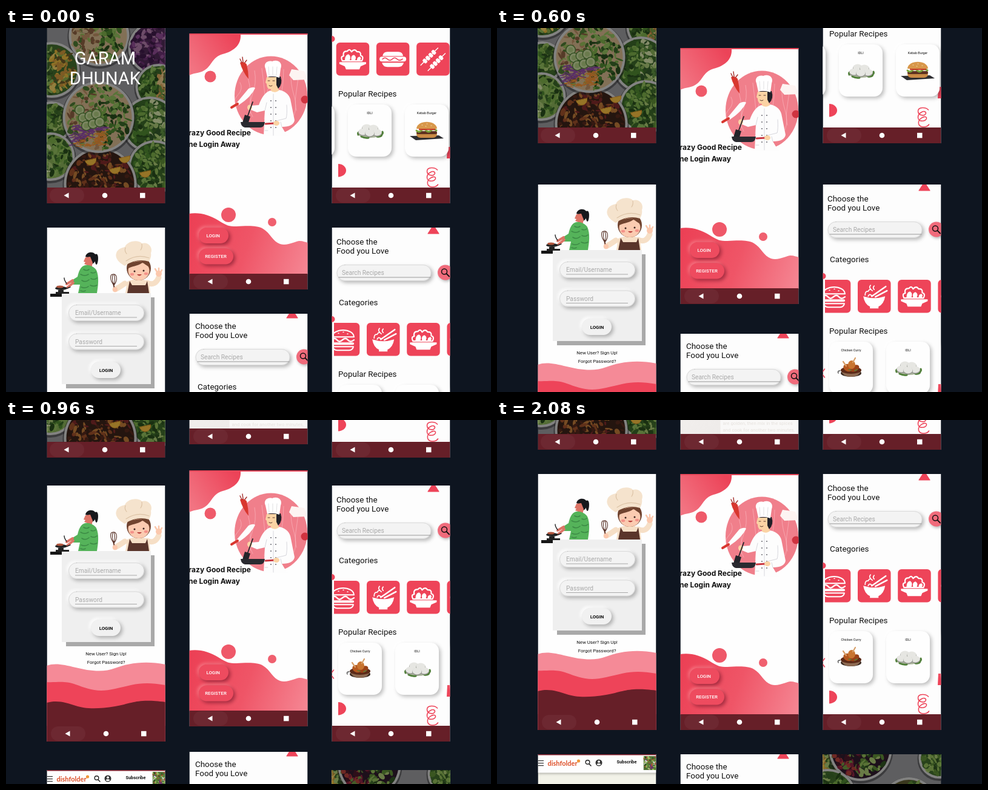
These frames come from a looping animation (800x600 px, 3.04 s). An HTML page with a canvas:

```html
<!DOCTYPE html>
<html lang="en">
<head>
<meta charset="utf-8">
<title>Recipe app screens</title>
<style>
html, body { margin: 0; width: 100%; height: 100%; overflow: hidden; background: #0e1520; }
canvas { display: block; }
</style>
</head>
<body>
<canvas id="stage" width="800" height="600"></canvas>
<script>
const W = 195, H = 422, RED = '#ee4459', DARK = '#661f28', INK = '#111';
const stage = document.getElementById('stage').getContext('2d');
let g;

// ---------- drawing helpers ----------
function screen(draw) {
  const c = document.createElement('canvas');
  c.width = 196;
  c.height = H;
  g = c.getContext('2d');
  g.lineCap = g.lineJoin = 'round';
  g.translate(0.5, 0);
  g.beginPath();
  g.rect(0, 0, W, H);
  g.clip();
  draw();
  return c;
}
function rect(x, y, w, h, fill) {
  g.fillStyle = fill;
  g.fillRect(x, y, w, h);
}
function shape(d, fill, stroke, lw = 1) {
  const p = new Path2D(d);
  if (fill) { g.fillStyle = fill; g.fill(p); }
  if (stroke) { g.strokeStyle = stroke; g.lineWidth = lw; g.stroke(p); }
}
const line = (d, col, lw) => shape(d, null, col, lw);
function oval(x, y, rx, ry, fill, rot = 0) {
  g.fillStyle = fill;
  g.beginPath();
  g.ellipse(x, y, rx, ry, rot, 0, Math.PI * 2);
  g.fill();
}
const disc = (x, y, r, fill) => oval(x, y, r, r, fill);
function round(x, y, w, h, r, fill) {
  g.fillStyle = fill;
  g.beginPath();
  g.roundRect(x, y, w, h, r);
  g.fill();
}
function shadow(col, blur = 0, dx = 0, dy = dx) {
  g.shadowColor = col;
  g.shadowBlur = blur;
  g.shadowOffsetX = dx;
  g.shadowOffsetY = dy;
}
function soft(x, y, w, h, r, fill, dark, light) {
  shadow(light, 5, -2.5);
  round(x, y, w, h, r, fill);
  shadow(dark, 6, 3);
  round(x, y, w, h, r, fill);
  shadow('transparent');
}
function text(s, x, y, size, col = INK, align = 'left', weight = 400, face = 'Roboto') {
  g.font = `${weight} ${size}px ${face}, sans-serif`;
  g.textAlign = align;
  g.fillStyle = col;
  g.fillText(s, x, y);
}
function blend(x0, y0, x1, y1, ...cols) {
  const f = g.createLinearGradient(x0, y0, x1, y1);
  cols.forEach((c, i) => f.addColorStop(i / (cols.length - 1), c));
  return f;
}
function at(x, y, draw) {
  g.save();
  g.translate(x, y);
  draw();
  g.restore();
}
function nav(x = 34.5) {
  rect(0, 396, W, 26, DARK);
  round(x - 28, 397, 57, 24, 12, '#6d2831');
  shape(`M${x - 4.5} 409l8-4.5v9z`, '#fff');
  disc(x + 63, 409, 4.3, '#fff');
  rect(x + 121, 404.8, 8.5, 8.5, '#fff');
}
function field(label, x, y, w, tx) {
  soft(x, y, w, 27, 13.5, '#f3f3f3', 'rgba(0,0,0,.28)', '#fff');
  g.strokeStyle = 'rgba(0,0,0,.1)';
  g.lineWidth = 1;
  g.beginPath();
  g.roundRect(x + 0.5, y + 0.5, w - 1, 26, 13);
  g.stroke();
  text(label, tx, y + 17, 10.2, '#a9a9a9');
}

// ---------- salad photo ----------
function rng(seed) {
  return () => (seed = (seed * 16807) % 2147483647) / 2147483647;
}
const greens = ['#5d8a35', '#8fb857', '#2f5220', '#a9c670', '#416a2b'];
const mix = {
  red: ['#8a2440', '#4a1828', '#b2413a', '#6f9440', '#2f1a2c'],
  green: greens,
  corn: ['#e3b43c', '#eccb62', '#8aa848', '#6d5a28', '#c9923a'],
  plum: ['#6b3070', '#8f4c92', '#3f1a48', '#b07aa8', '#4f2a55'],
  chips: ['#d8a55a', '#b98440', '#6d9540', '#e6c585', '#5f5a30'],
  meat: ['#b98c62', '#92b857', '#8a5f40', '#4c7730', '#d2b48a'],
  pale: ['#a8c574', '#5f9040', '#d3dfa8', '#34592a', '#86ad55'],
  leaf: ['#4f8530', '#7bab48', '#284c1c', '#90bb5c', '#3a6628'],
  grain: ['#9a4f2a', '#55281c', '#bd7838', '#7d2a2a', '#3a2218']
};
// [x, y, radius, left filling, right filling]
const bowls = [
  [4, 0, 36, 'corn', 'green'], [62, -8, 52, 'red', 'green'], [192, 6, 34, 'green', 'green'],
  [8, 72, 48, 'green', 'leaf'], [142, 84, 46, 'chips', 'green'], [86, 146, 50, 'meat', 'leaf'],
  [8, 202, 46, 'green', 'corn'], [178, 166, 44, 'plum', 'plum'], [184, 230, 38, 'leaf', 'chips'],
  [8, 288, 34, 'leaf', 'green'], [6, 345, 40, 'pale', 'leaf'], [170, 292, 46, 'leaf', 'pale'],
  [178, 362, 44, 'leaf', 'green'], [88, 390, 60, 'grain', 'grain'], [85, 280, 59, 'meat', 'leaf']
];
function salad() {
  const rnd = rng(77);
  rect(0, 0, W, H, '#97979a');
  for (const [x, y, r, left, right] of bowls) {
    disc(x, y + 2, r + 2, 'rgba(40,40,45,.5)');
    disc(x, y, r, '#d2d2d0');
    disc(x, y, r - 4, mix[left][4]);
    for (let i = 0; i < r * 4; i++) {
      const a = rnd() * 6.283, d = Math.sqrt(rnd()) * (r - 7);
      const dx = d * Math.cos(a);
      oval(x + dx, y + d * Math.sin(a), 2 + rnd() * 5, 1.2 + rnd() * 3,
        mix[dx < 0 ? left : right][Math.floor(rnd() * 5)], rnd() * 3.14);
    }
  }
  // shredded cabbage and carrot, cucumber, lemon wedges
  for (let i = 0; i < 110; i++) {
    const x = 36 + rnd() * 56, y = 294 + rnd() * 34;
    line(`M${x} ${y}q${rnd() * 8} ${rnd() * 8 - 6} ${6 + rnd() * 7} ${rnd() * 8 - 4}`,
      x + 2 * y < 690 ? '#8e4aa2' : '#ee8f35', 1.6);
  }
  for (let i = 0; i < 7; i++) {
    const x = 54 + i * 5.5, y = 268 + (i * 13) % 29;
    disc(x, y, 8.5, '#4f7d34');
    disc(x, y, 7.2, '#c5d69a');
    disc(x, y, 4, '#abc67c');
  }
  for (const [x, y] of [[128, 348], [162, 372], [72, 352], [112, 366]]) {
    shape(`M${x - 9} ${y}a9 9 0 0 0 18 -4z`, '#f2bb3f', '#dc9428');
  }
  rect(0, 0, W, H, 'rgba(0,0,0,.38)');
}

function welcome() {
  salad();
  text('GARAM', 96, 192.5, 29.2, '#fff', 'center');
  text('DHUNAK', 96, 226, 29.2, '#fff', 'center');
  nav(32.5);
}

// ---------- sign-in ----------
function cook() {
  shape('M147 133C152 130 153 139 151 147C150 151 148 151 147 146L145 136Z', '#17181c');
  shape('M131 137C132 129 144 127 148 134C150 141 146 148 142 149L137 139Z', '#17181c');
  shape('M131 138L139 137L143 147L141 156L133 155L134 151L129 149L131 146L128 145Z', '#dd7567');
  shape('M128 152C134 149 144 152 149 159C154 170 152 185 150 197H119L122 183L109 183L107 177L118 170C120 162 122 155 128 152Z', '#55b35a');
  line('M128 158q5 3 9 0M123 166q7 4 13 0M140 163q5 2 8-1M125 176q6 4 12-1M140 173q6 3 10-1M124 187q7 3 12-1M139 184q6 3 11 0M123 193q5 2 8 0', '#3c8a45', 1.6);
  line('M111 180L101 188M110 176L100 182', '#dd7567', 4);
  oval(91, 189, 10, 3, '#222');
  oval(89, 186.5, 6, 2, '#b0563e');
  line('M101 189l5-2M100 181q-4-5-4-9', '#222', 1.4);
  rect(86, 192, 9, 5, '#222');
  rect(73, 198, 19, 5, '#161616');
  rect(82, 195, 22, 3, '#222');
}
function kid() {
  line('M196 181Q186 188 180 191M233 180Q246 186 252 171', '#f6dfc6', 9);
  line('M179 190l-2-9', '#6a3b2d', 2);
  shape('M178 184C170 174 172 166 176 166C182 165 186 174 178 184ZM178 184Q174 174 176 166M178 184Q181 174 178 167', null, '#5a352b', 1.1);
  disc(180, 191, 4, '#fbc8ad');
  disc(252, 165, 5, '#fbc8ad');
  line('M249 162l-3-5M252 161l0-5M255 163l2-4', '#fbc8ad', 2.6);
  shape('M200 178Q218 170 236 178L238 197H197Z', '#f6dfc6');
  shape('M204 177L208 184H230L233 177L236 197H200Z', '#5a352b');
  disc(219, 156, 20, '#70432f');
  oval(219, 160, 17.5, 16, '#fbcbb1');
  shape('M200 157C202 143 232 138 238 155C231 151 228 148 225 147C216 153 208 152 200 157Z', '#70432f');
  disc(212, 161, 1.5, '#3d2520');
  disc(227, 160, 1.5, '#3d2520');
  oval(208, 166, 3.2, 2.2, '#f4938a');
  oval(231, 165, 3.2, 2.2, '#f4938a');
  shape('M216 166q4 5 8 0z', '#b6413c');
  shape('M196 152C188 148 179 140 182 131C184 124 192 122 196 121C201 110 219 109 224 115C234 112 243 121 239 131C240 136 238 141 236 145Q215 139 196 152Z', '#f5e3cd');
  line('M198 144Q216 132 236 139M197 122q-2 6 2 10M224 116q1 6-2 10', '#dcc3a6', 1.2);
}
function signIn() {
  rect(0, 0, W, H, '#fefefe');
  at(-67.5, -89, () => {
    rect(99, 204, 146, 150, '#a9a9a9');
    rect(92, 197, 147, 150, '#efefef');
    cook();
    kid();
    field('Email/Username', 103, 216, 125, 114);
    field('Password', 103, 263.5, 125, 114);
    rect(114, 236.5, 102, 1, '#aaa');
    rect(114, 284, 102, 1, '#aaa');
    soft(140, 310, 49, 27, 13.5, '#f1f1f1', 'rgba(0,0,0,.28)', '#fff');
    text('LOGIN', 165, 327, 7.9, INK, 'center', 700);
    text('New User? Sign Up!', 165, 368.8, 7.8, INK, 'center');
    text('Forgot Password?', 165, 383.2, 7.8, INK, 'center');
    shape('M67 386C80 381 95 384 115 389S160 398 180 390S230 377 263 384V511H67Z', '#f58a97');
    shape('M67 413C85 414 95 410 115 417S150 431 180 424S225 411 263 418V511H67Z', RED);
    shape('M67 447C85 442 100 447 115 452S150 458 180 453S215 440 263 446V511H67Z', DARK);
  });
  nav();
}

// ---------- landing ----------
function chef() {
  oval(437, 191.5, 60, 65, '#f07f8b');
  for (let i = 0; i < 9; i++) {
    const x = 386 + i * 12, d = Math.sqrt(Math.max(0, 3300 - (x - 437) ** 2));
    line(`M${x} ${191 - d * 0.8}q${6 - i} ${d * 0.4} ${i % 2 ? 5 : -4} ${d * 0.8}t${i % 3 - 1} ${d * 0.7}`, 'rgba(255,205,210,.6)', 0.8);
  }
  // flying kitchen things
  shape('M386 137Q392 134 397 140Q400 152 400 164Q390 152 386 137Z', '#d8372f');
  line('M389 137l-3-6M391 136l-1-8M394 137l3-4', '#a32d2a', 1.4);
  shape('M380 204L400 180Q408 176 411 179Q404 194 384 207Z', '#fdfdfd');
  line('M372 211l10-6', '#d8372f', 4);
  shape('M471 148L492 151L497 165L474 166L467 158Z', '#fdf4f2');
  disc(493, 198, 6.5, '#cf3340');
  // figure
  shape('M432 160H453Q457 172 449 180L436 178Z', '#202028');
  shape('M430 161H446V174L452 186H437V181Q430 181 430 172L428 170Z', '#fbd3a4');
  line('M432 167h3M440 167h3M434 175q3 2 5 0', '#4a2c24', 0.9);
  shape('M431 161L428 147C424 139 431 133 439 135C448 131 457 137 453 147L451 162Q440 158 431 161Z', '#fff');
  line('M434 158l-1-14M440 157v-13M446 158l1-14', '#d7d7da', 0.8);
  shape('M436 183Q444 189 451 182Q468 186 470 202L476 232Q474 243 455 243L464 258H425L427 216L414 219L402 214L404 208L417 207Q424 187 436 183Z', '#fdfdfd');
  line('M427 216l3-13M441 189v68M463 207q1 16-1 22l-16 4M455 243l-2-8M432 249h-5', '#d3d3d8', 0.9);
  for (let y = 200; y < 250; y += 11) {
    disc(437, y, 0.9, '#55565e');
    disc(445, y, 0.9, '#55565e');
  }
  oval(402, 211, 4, 4.5, '#fbd3a4');
  line('M407 202L398 227', '#24242a', 1.8);
  shape('M394 223L403 226L399 239L390 236Z', '#24242a');
  shape('M387 235H427Q426 244 419 244H394Q388 243 387 235Z', '#2a2a30');
  line('M428 238l15-1', '#c93640', 2.8);
  oval(446, 237, 5, 4, '#fbd3a4');
}
function landing() {
  rect(0, 0, W, H, '#fefefe');
  at(-302.5, -89, () => {
    shape('M302 91H387C388 107 377 117 361 122C341 127 342 137 331 147C322 155 312 153 302 158Z', blend(302, 140, 375, 91, '#f27482', '#ec4358'));
    rect(302, 89, 196, 2, '#e9475a');
    disc(337, 160, 9.5, '#ef5a6a');
    chef();
    text('Crazy Good Recipe', 404, 257, 12, INK, 'right', 700, 'Inter');
    text('One Login Away', 386, 275.7, 12, INK, 'right', 700, 'Inter');
    const tint = blend(302, 400, 498, 470, '#ec4055', '#ef5567', '#f58592');
    shape('M302 386C318 383 336 388 350 397S368 407 380 407S412 404 424 411S440 432 452 436S478 431 484 431S494 433 498 434V486H302Z', tint);
    disc(367, 388, 12, '#ef5869');
    disc(439, 400, 7, '#f0606f');
    const d = 'rgba(95,10,30,.55)', l = 'rgba(255,140,150,.6)';
    soft(318, 409, 49, 26, 13, '#ee4b5f', d, l);
    soft(318, 443.5, 57, 26, 13, '#ee4b5f', d, l);
    text('LOGIN', 341.7, 425, 7.8, '#fff', 'center', 500);
    text('REGISTER', 346, 459.2, 7.8, '#fff', 'center', 500);
  });
  nav();
}

// ---------- home ----------
const icons = [
  () => {
    shape('M-18 -4C-17 -19 17 -19 18 -4Z', null, '#fff', 2);
    line('M-8 -10h1M0 -12h1M7 -9h1', '#fff', 1.6);
    line('M-19 1q5 -5 9 0t9 0t9 0t10 0', '#fff', 2.4);
    round(-18, 5, 36, 4, 2, '#fff');
    shape('M-17 12H17Q16 18 10 18H-10Q-16 18 -17 12Z', null, '#fff', 2);
  },
  () => {
    shape('M-18 0Q0 6 18 0Q16 13 7 17V20H-7V17Q-16 13 -18 0Z', '#fff');
    line('M-4 0L19 -16M2 1L21 -9', '#fff', 2.6);
    line('M-15 -2q0 -7 5 -6q3 -6 7 -1M-10 0q2 -5 6 -1M-6 -12q-3 -3 0 -6M0 -11q-3 -3 0 -6', '#fff', 1.7);
  },
  () => {
    shape('M-22 5H22V8L13 12L11 17H-11L-13 12L-22 8Z', '#fff');
    shape('M-17 3q-4 -7 2 -8q-2 -8 6 -8q4 -5 7 1q5 -6 9 0q7 -1 6 6q6 2 2 9Z', null, '#fff', 2.2);
    shape('M-13 2q0 -9 6 -10q5 3 2 10ZM-2 2q-2 -8 4 -9q5 3 2 9ZM7 2q0 -6 5 -6q3 3 0 6Z', '#fff');
  },
  () => {
    shape('M-17 -5Q-16 -12 -9 -12H9Q16 -12 17 -5Z', '#fff');
    round(-22, -4, 44, 8, 4, '#fff');
    line('M-17 0q4 -4 8 0t8 0t8 0t9 0', RED, 1.6);
    shape('M-18 6H18Q16 13 9 13H-9Q-16 13 -18 6Z', '#fff');
  },
  () => {
    for (const [x, y] of [[-6, -4], [6, 5]]) {
      at(x, y, () => {
        g.rotate(-Math.PI / 4);
        line('M-20 0H20', '#fff', 1.5);
        for (let i = -13; i < 12; i += 6.8) round(i, -4, 5.6, 8, 2, '#fff');
      });
    }
  }
];
const dishes = [
  ['Chicken Curry', () => {
    oval(0, 9, 17, 6, '#3b2a22');
    shape('M-17 3H17Q14 15 0 15Q-14 15 -17 3Z', '#8d6a52');
    oval(0, 4, 17, 6, '#5b2a18');
    oval(-5, 0, 8, 6, '#b5581f', 0.4);
    oval(6, 1, 8, 5, '#9a4218', -0.5);
    oval(1, -5, 6, 7, '#c87430');
    line('M3 -9l4 -7M-8 -3l-5 -7', '#d7a06a', 2.2);
    line('M-4 3l4 1M6 5l4 -2', '#58803a', 1.6);
    line('M-18 5q-5 0 -3 4', '#555', 1.5);
  }],
  ['IDLI', () => {
    oval(0, 5, 20, 7, '#a9b39a');
    line('M-19 7q-2 -4 3 -5M17 8q6 -2 4 -6M-14 10q6 3 12 2M12 10q7 1 8 -3', '#4f7f38', 3);
    for (const [x, y] of [[-5, -5], [6, -4], [-11, 2], [12, 3], [0, 4]]) {
      oval(x, y + 1.2, 8, 5.8, '#93958f');
      oval(x, y, 7.6, 5.4, '#e6e6e2');
    }
  }],
  ['Kebab Burger', () => {
    shape('M-28 9L20 8L28 13L-18 16Z', '#2d2d31');
    shape('M-17 5H17Q17 12 10 12H-10Q-17 12 -17 5Z', '#c98a45');
    round(-17, 1, 34, 5, 2.5, '#5f3321');
    line('M-17 0q4 4 8 0t8 0t8 0t9 0', '#79a63c', 3);
    line('M-12 -2H13', '#c9412c', 2.5);
    shape('M-17 -3C-16 -18 16 -18 17 -3Z', '#d8974a');
    line('M-8 -9h1M0 -11h1M7 -8h1M-2 -7h1', '#f4deb0', 1.2);
  }]
];
function home(dx, dy, tileShift, cardShift) {
  rect(0, 0, W, H, '#fdfdfd');
  at(dx, dy, () => {
    shape('M167.5 -4L176.5 10H158.5Z', RED, RED, 1.2);
    disc(0, 151, 5, RED);
    shape('M190.5 329H198V348H189.5Z', RED);
    line('M3 304l-5 7l5 7', RED, 1.5);
    shape('M10.5 357A13 10.7 0 0 1 10.5 378.4Z', RED);
    line('M174 367C170 362 157 362 157 369C157 377 170 378 170 372C169 366 156 372 157 380C158 388 172 386 171 380C169 375 156 382 158 390C160 397 172 396 175 391', RED, 1.6);

    text('Choose the', 7.5, 28, 13.4);
    text('Food you Love', 7.5, 43.3, 13.4);
    field('Search Recipes', 8, 61, 156, 16.5);
    rect(11, 81.5, 152, 1, '#999');
    shadow('rgba(0,0,0,.3)', 5, 2);
    disc(187, 74, 12.5, '#f06b7b');
    shadow('transparent');
    g.strokeStyle = INK;
    g.lineWidth = 1.5;
    g.beginPath();
    g.arc(185.5, 72.5, 4.5, 0, 7);
    g.stroke();
    line('M189 76l4.5 4.5', INK, 1.8);
    text('Categories', 11.5, 128, 13.4);
    text('Popular Recipes', 10.5, 245.5, 13.4);

    g.save();
    g.beginPath();
    g.rect(3.5, 150, W, 70);
    g.clip();
    icons.forEach((icon, i) => {
      const x = -8.7 + i * 66.2 - tileShift;
      round(x, 157, 54.5, 54.5, 6, RED);
      at(x + 27.2, 184.2, icon);
    });
    g.restore();

    dishes.forEach(([name, food], i) => {
      const x = 10.5 + i * 94 - cardShift;
      soft(x, 259, 72, 86, 14, '#fefefe', 'rgba(0,0,0,.25)', '#fff');
      text(name, x + 36, 275, 5.4, INK, 'center');
      at(x + 36, 302, food);
    });
  });
  nav();
}

// ---------- recipe pages ----------
function site() {
  rect(0, 0, W, H, '#f2f2e8');
  shadow('rgba(0,0,0,.3)', 4, 0, 1);
  rect(0, 0, W, 30.5, '#fefefe');
  shadow('transparent');
  rect(0, 0, W, 1.5, '#8c2431');
  for (let y = 10; y < 20; y += 4) rect(0, y, 9.5, 1.2, '#333');
  text('dishfolder', 16, 18.5, 11, '#dd4f28', 'left', 700, 'Lato');
  disc(67, 11, 2.6, '#f0973a');
  line('M84.5 16l3 3', '#222', 1.5);
  disc(82, 13, 4, '#222');
  disc(82, 13, 2.6, '#fff');
  disc(100.5, 14, 5.5, '#333');
  disc(100.5, 12.2, 1.9, '#fff');
  oval(100.5, 16.6, 3.2, 1.7, '#fff');
  text('Subscribe', 130, 14.5, 7.3, INK, 'left', 700);
  g.save();
  g.beginPath();
  g.rect(174, 3, 21, 23);
  g.clip();
  const rnd = rng(9), cols = [...greens, '#d8d8d2', '#a84a35', '#6b3070'];
  rect(174, 3, 21, 23, '#55743a');
  for (let i = 0; i < 60; i++) {
    oval(174 + rnd() * 21, 3 + rnd() * 23, 2.4, 1.2, cols[Math.floor(rnd() * 8)], rnd() * 3);
  }
  g.restore();
  nav();
}
function details() {
  rect(0, 0, W, H, '#f9f8f7');
  rect(0, 300, 66, 96, blend(0, 300, 66, 396, '#f5f2f0', '#eeebe9'));
  const words = ['Add the onions and stir until they', 'are golden, then mix in the spices', 'and cook for another two minutes,'];
  for (let i = 0; i < 9; i++) text(words[i % 3], 70, 310 + i * 10.2, 7.8, '#e6e2de');
  nav();
}

// ---------- motion ----------
const hello = screen(welcome);
// [picture, x, final y, distance travelled, place in the stagger]
const phones = [
  [hello, 67, -373, -240, 0],
  [screen(signIn), 67, 89, -240, 1],
  [screen(site), 67, 551, -240, 2],
  [screen(details), 302, -373, 80, 2],
  [screen(landing), 302, 89, 80, 1],
  [screen(() => home(2, -3, 0, 0)), 302, 551, 80, 0],
  [screen(() => home(0, 0, 116.5, 78)), 537, -373, -240, 0],
  [screen(() => home(0, 0, 0, 0)), 537, 89, -240, 1],
  [hello, 537, 551, -240, 2]
];
const LOOP = 3040, STEP = 40, START = 474, STAGGER = 40, SPAN = 780;

function frame() {
  const t = Math.floor((performance.now() % LOOP) / STEP) * STEP;
  stage.fillStyle = '#0e1520';
  stage.fillRect(0, 0, 800, 600);
  for (const [pic, x, end, dist, order] of phones) {
    const u = Math.min(1, Math.max(0, (t - START - order * STAGGER) / SPAN));
    stage.drawImage(pic, x, Math.round(end - dist * (1 - u) ** 3));
  }
  requestAnimationFrame(frame);
}
frame();
</script>
</body>
</html>
```
